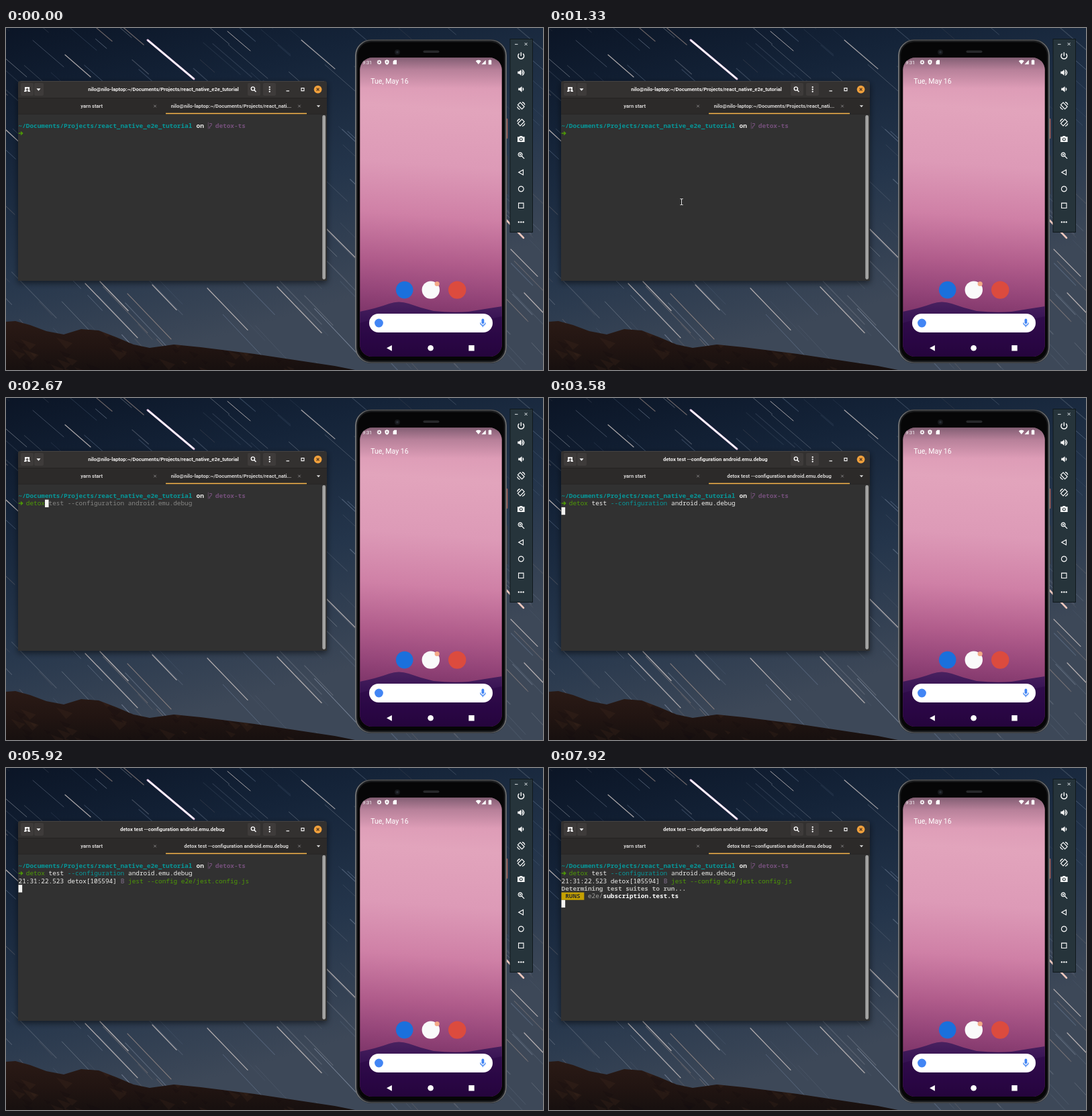
An HTML page with a canvas for the animation above (8 s loop, 800x510 px).

```html
<!DOCTYPE html>
<html lang="en">
<head>
<meta charset="utf-8">
<title>Terminal and phone emulator</title>
<style>
html, body { margin: 0; width: 100%; height: 100%; overflow: hidden; background: #16263b; }
canvas { display: block; width: 800px; height: 510px; }
</style>
</head>
<body>
<canvas id="stage" width="800" height="510"></canvas>
<script>
const LOOP = 8000;
const MONO = '"Noto Sans Mono", "DejaVu Sans Mono", monospace';
const SANS = 'Roboto, "Open Sans", sans-serif';
const GREEN = '#4e9a06', CYAN = '#06989a', PURPLE = '#75507b', WHITE = '#eeeeec';

const stage = document.getElementById('stage').getContext('2d');
const scene = document.createElement('canvas');
scene.width = 800;
scene.height = 510;
let c = scene.getContext('2d');

function seeded(seed) {
  return () => {
    seed = (seed * 1664525 + 1013904223) % 4294967296;
    return seed / 4294967296;
  };
}

function ramp(x0, y0, x1, y1, stops) {
  const g = c.createLinearGradient(x0, y0, x1, y1);
  stops.forEach(([at, color]) => g.addColorStop(at, color));
  return g;
}

function box(x, y, w, h, color, r = 0) {
  c.fillStyle = color;
  c.beginPath();
  c.roundRect(x, y, w, h, r);
  c.fill();
}

function disc(x, y, r, color) {
  c.fillStyle = color;
  c.beginPath();
  c.arc(x, y, r, 0, Math.PI * 2);
  c.fill();
}

function line(x0, y0, x1, y1, color, width) {
  c.strokeStyle = color;
  c.lineWidth = width;
  c.beginPath();
  c.moveTo(x0, y0);
  c.lineTo(x1, y1);
  c.stroke();
}

// Icons are small paths around their own centre.
function strokeIcon(x, y, d, color = '#fff', width = 1.1) {
  c.save();
  c.translate(x, y);
  c.strokeStyle = color;
  c.lineWidth = width;
  c.stroke(new Path2D(d));
  c.restore();
}

function fillIcon(x, y, d, color = '#fff') {
  c.save();
  c.translate(x, y);
  c.fillStyle = color;
  c.fill(new Path2D(d), 'evenodd');
  c.restore();
}

function label(text, x, y, font, color, align = 'left') {
  c.font = font;
  c.fillStyle = color;
  c.textAlign = align;
  c.fillText(text, x, y);
}

// Trails get steeper towards the horizon.
function trail(x, y, len, color, width) {
  const slope = 0.85 + Math.max(y, 0) / 510 * 0.25;
  line(x, y, x + len, y + len * slope, color, width);
}

function drawSky() {
  box(0, 0, 800, 510, ramp(0, 0, 150, 510, [
    [0, '#0b1526'], [0.3, '#142338'], [0.65, '#24354b'], [1, '#3d4858']
  ]));
  const rnd = seeded(29);
  const tints = ['#e6e8ee', '#b3c0d6', '#d8b9a8', '#8499b8'];
  c.lineCap = 'round';
  for (let i = 0; i < 230; i++) {
    const x = rnd() * 880 - 70, y = rnd() * 560 - 50, len = 16 + rnd() * 54;
    c.globalAlpha = 0.1 + rnd() * rnd() * 0.5;
    trail(x, y, len, tints[i % 4], 0.6 + rnd() * 0.7);
  }
  c.globalAlpha = 0.8;
  const bright = [
    [140, 378, 42, 1.4], [218, 383, 36, 1.3], [118, 381, 78, 1.2], [300, 388, 60, 1.2],
    [404, 386, 66, 1.3], [478, 300, 42, 1.3], [88, 40, 38, 1.2], [440, 18, 50, 1.1],
    [330, 5, 34, 1], [0, 152, 18, 1.3], [772, 395, 28, 1.2], [752, 330, 40, 1.1]
  ];
  bright.forEach(([x, y, len, w]) => trail(x, y, len, '#d3c8c6', w));
  c.globalAlpha = 1;
  line(211, 18, 280, 76, '#e9c5e8', 3);
  line(212, 19, 279, 75, '#ffffff', 1.8);
  line(745, 286, 771, 313, '#ecc7bd', 2.6);
  c.lineCap = 'butt';
}

function drawHills() {
  const ridge = [
    [0, 438], [14, 437], [36, 443], [60, 452], [86, 457], [112, 449], [138, 451], [164, 461],
    [190, 472], [214, 477], [250, 472], [290, 476], [330, 481], [370, 486], [410, 492], [450, 498], [490, 504], [520, 510]
  ];
  c.beginPath();
  c.moveTo(0, 510);
  ridge.forEach(([x, y]) => c.lineTo(x, y));
  c.closePath();
  c.fillStyle = ramp(0, 437, 0, 510, [[0, '#2a1a15'], [0.5, '#221512'], [1, '#17100f']]);
  c.fill();
  c.save();
  c.clip();
  const rnd = seeded(7);
  c.globalAlpha = 0.16;
  for (let i = 0; i < 70; i++) {
    const x = rnd() * 420, y = 445 + rnd() * 65, w = 8 + rnd() * 18;
    c.fillStyle = i % 2 ? '#593a2a' : '#0e0b0d';
    c.beginPath();
    c.moveTo(x, y);
    c.lineTo(x + w, y + w * 0.35);
    c.lineTo(x + w * 0.6, y + w * 0.7);
    c.fill();
  }
  c.restore();
}

function drawWindow() {
  c.save();
  c.shadowColor = 'rgba(0,0,0,.55)';
  c.shadowBlur = 10;
  c.shadowOffsetY = 3;
  box(18, 79, 460, 298, '#313131', [4, 4, 0, 0]);
  c.restore();
  box(18, 79, 460, 26, '#333130', [4, 4, 0, 0]);
  box(22, 79, 452, 0.8, '#4a4847');
  box(18, 104, 460, 24, '#2c2a29');
  box(18, 104, 460, 0.8, '#232120');
  box(18, 128, 460, 1, '#272625');
  box(238, 126.7, 210, 1.6, '#fbb84c');
  box(471.3, 130, 4.8, 245, '#a3a3a2', 2.4);

  [[22, 19], [42, 14], [360, 19], [383, 19]].forEach(([x, w]) => box(x, 82, w, 19, '#3e3b3a', 2));
  fillIcon(31.5, 91.5, 'M-3.5 -3.5H3.5V2H4.5V3.5H1V2H-1V3.5H-4.5V2H-3.5ZM-.6 -2V-.6H-2V.6H-.6V2H.6V.6H2V-.6H.6V-2Z');
  fillIcon(48.5, 91.8, 'M-3 -1.5H3L0 2Z');
  strokeIcon(368.5, 91, 'M2 -.5A2.6 2.6 0 1 1 -3.2 -.5A2.6 2.6 0 1 1 2 -.5M1.3 1.5L4 4.2', '#fff', 1.4);
  [-3.3, 0, 3.3].forEach(dy => disc(392.7, 91.5 + dy, 1.15, '#fff'));
  box(417.5, 93.2, 4.5, 1.3, '#eee');
  strokeIcon(442, 91.7, 'M-2 -2H2V2H-2Z', '#eee', 1.2);
  disc(464.6, 91.6, 5.9, '#f0a03c');
  strokeIcon(464.6, 91.6, 'M-1.9 -1.9L1.9 1.9M1.9 -1.9L-1.9 1.9', '#4b3420', 1.2);

  [222, 437].forEach(x => strokeIcon(x, 116.5, 'M-1.8 -1.8L1.8 1.8M1.8 -1.8L-1.8 1.8', '#8c8a89', 0.9));
  fillIcon(465.5, 116.5, 'M-2.7 -1.2H2.7L0 1.8Z', '#ddd');
  label('yarn start', 127.7, 118.7, `bold 7.6px ${SANS}`, '#d6d4d3', 'center');
}

function drawPhone() {
  [[135, 30, '#b8665a'], [190, 58, '#3c3d40']].forEach(([y, h, color]) => box(744, y, 3.2, h, color, 1));
  box(520, 17, 226, 483, '#1b1c1e', 24);
  c.strokeStyle = ramp(520, 0, 746, 0, [[0, '#7b7d80'], [0.1, '#4c4e51'], [0.9, '#4c4e51'], [1, '#737578']]);
  c.lineWidth = 1.7;
  c.beginPath();
  c.roundRect(521, 18, 224, 481, 23);
  c.stroke();
  box(524, 21, 218, 475, '#060607', 20);
  disc(583, 36, 4, '#17181b');
  disc(583, 36, 1.8, '#2c3038');
  box(621.5, 33.4, 24, 3.6, '#27282b', 1.8);

  c.save();
  c.beginPath();
  c.roundRect(527.3, 44.3, 211.4, 445.7, 18);
  c.clip();
  box(527, 44, 212, 446, ramp(645, 44, 620, 425, [
    [0, '#d893b0'], [0.2, '#e2a4bc'], [0.42, '#dd9ab7'], [0.62, '#cf80a6'],
    [0.8, '#b05c8b'], [0.93, '#934478'], [1, '#82386c']
  ]));
  box(527, 44, 212, 46, ramp(0, 44, 0, 90, [[0, 'rgba(60,50,65,.55)'], [0.4, 'rgba(60,50,65,.22)'], [1, 'rgba(60,50,65,0)']]));
  fillIcon(527, 0, 'M0 423Q25 418 44 411Q58 406 73 411Q92 418 110 422Q138 425 162 423Q186 419 212 415V490H0Z',
    ramp(0, 408, 0, 490, [[0, '#4a2260'], [0.3, '#381454'], [0.7, '#2d0847'], [1, '#24053a']]));
  fillIcon(527, 0, 'M0 440Q45 426 90 437T212 430V490H0Z', 'rgba(38,6,66,.45)');
  label('9:31', 531, 53.6, `7.4px ${SANS}`, '#fff');
  c.restore();

  strokeIcon(556, 51, 'M2 0A2 2 0 1 1 -2 0A2 2 0 1 1 2 0', '#fff', 1.5);
  for (let i = 0; i < 8; i++) {
    const a = i * Math.PI / 4;
    disc(556 + Math.cos(a) * 2.9, 51 + Math.sin(a) * 2.9, 0.6, '#fff');
  }
  fillIcon(567.5, 51, 'M0 -3.8L3 -2.6V0Q3 2.7 0 3.8Q-3 2.7 -3 0V-2.6ZM-.7 -1.5H.7V1.2H-.7Z');
  fillIcon(579.3, 51, 'M-.8 -3.3H2.7V3.3H-2.7V-1.3Z');
  fillIcon(703.8, 51, 'M-4 -1.8Q0 -4.6 4 -1.8L0 3.2Z');
  fillIcon(711.8, 51, 'M3 -3.3V3.2H-3.3Z');
  fillIcon(721, 51, 'M-1 -3.6H1V-3H2.2V3.4H-2.2V-3H-1Z');
  label('Tue, May 16', 543.2, 82.6, `10.6px ${SANS}`, '#fff');

  disc(593.7, 390.6, 12.8, '#1a70dc');
  disc(632.8, 390.6, 13.2, '#fafafa');
  disc(642.2, 381.5, 3.6, '#f3a986');
  disc(672.2, 390.6, 13.2, '#dc4b3e');
  box(541, 426, 184, 28, '#fff', 14);
  disc(555.5, 440, 6.4, '#4285f4');
  box(708.5, 433.6, 3.8, 7.6, '#4285f4', 1.9);
  strokeIcon(710.4, 440, 'M-3.7 -.4A3.7 3.7 0 0 0 3.7 -.4M0 3.4V6', '#4285f4', 1.3);
  fillIcon(571.3, 477.3, 'M-4.3 0L3.6 -4.4V4.4Z');
  disc(632.6, 477.3, 4.3, '#fff');
  box(689.3, 473.1, 8.4, 8.4, '#fff');
}

function drawPanel() {
  box(750.5, 16, 34.5, 289, '#10181c');
  box(751.5, 17, 32.5, 287, '#26343b');
  const x = 767.3;
  line(758, 24.3, 762.5, 24.3, '#dfe5e8', 1);
  strokeIcon(774.6, 24, 'M-2 -2L2 2M2 -2L-2 2', '#dfe5e8', 1);
  strokeIcon(x, 41.5, 'M-2.9 -3.2A4.4 4.4 0 1 0 2.9 -3.2M0 -5.2V.3', '#fff', 1.4);
  const speaker = 'M-5 -1.7H-2.8L.2 -4.4V4.4L-2.8 1.7H-5Z';
  fillIcon(x, 66.5, speaker);
  strokeIcon(x, 66.5, 'M1.5 -2Q3.2 0 1.5 2M1.8 -4.3Q7.2 0 1.8 4.3', '#fff', 1.3);
  fillIcon(x + 1, 91.3, speaker);
  strokeIcon(x + 1, 91.3, 'M1.5 -2Q3.4 0 1.5 2', '#fff', 1.3);
  const rotate = 'M-4.8 -1.3L-1.3 -4.8L4.8 1.3L1.3 4.8ZM1.6 -5.4Q4.9 -4.6 5.6 -1.4M-1.6 5.4Q-4.9 4.6 -5.6 1.4';
  strokeIcon(x, 116, rotate, '#fff', 1.2);
  c.save();
  c.translate(x, 141);
  c.scale(-1, 1);
  strokeIcon(0, 0, rotate, '#fff', 1.2);
  c.restore();
  fillIcon(x, 165.5, 'M-5.3 -3.3H-2.6L-1.6 -4.6H1.6L2.6 -3.3H5.3V4.4H-5.3ZM2.5 .5A2.5 2.5 0 1 0 -2.5 .5A2.5 2.5 0 1 0 2.5 .5Z');
  disc(x, 166, 1.4, '#fff');
  strokeIcon(x, 190, 'M1.7 -1.2A2.9 2.9 0 1 1 -4.1 -1.2A2.9 2.9 0 1 1 1.7 -1.2M1 1L4.8 4.8M-2.6 -1.2H.2M-1.2 -2.6V.2', '#fff', 1.2);
  strokeIcon(x, 215.3, 'M-3.6 0L3.2 -3.8V3.8Z');
  strokeIcon(x, 240, 'M3.9 0A3.9 3.9 0 1 1 -3.9 0A3.9 3.9 0 1 1 3.9 0');
  strokeIcon(x, 264.8, 'M-3.7 -3.7H3.7V3.7H-3.7Z');
  [-3.4, 0, 3.4].forEach(dx => disc(x + dx, 289.4, 1.2, '#fff'));
}

const CELL = 5.64, ROW = 11.3, LEFT = 18.5, TOP = 140.3;

function put(row, col, text, color, bold) {
  label(text, LEFT + col * CELL, TOP + row * ROW + 8.7, `${bold ? 'bold ' : ''}9.4px ${MONO}`, color);
}

function block(row, col) {
  box(LEFT + col * CELL, TOP + row * ROW, CELL, ROW, '#f4f4f2');
}

const PATH = '~/Documents/Projects/react_native_e2e_tutorial';
const HOST = 'nilo@nilo-laptop:';
const COMMAND = 'detox test --configuration android.emu.debug';
const KEYS = [1920, 2080, 2250, 2420, 2580];
const ACCEPT = 2920, ENTER = 3330, JEST = 4580, SEARCH = 6580, RUNS = 7170;

function drawTitles(t) {
  const font = `bold 7.6px ${SANS}`;
  const busy = t >= ENTER;
  label(busy ? COMMAND : HOST + PATH, busy ? 247.8 : 234.5, 94.3, font, '#f2f0ef', 'center');
  label(busy ? COMMAND : HOST + PATH.slice(0, 31) + '...', busy ? 343 : 335.5, 118.7, font, '#d6d4d3', 'center');
}

function drawPrompt() {
  put(0, 0, PATH, CYAN, true);
  put(0, 47, 'on', WHITE, true);
  line(301.3, 140.5, 301.3, 150.5, '#69506d', 0.9);
  strokeIcon(304.6, 146, 'M-1.6 -3.5H1.6V-1.2L-1.3 1.5V4', PURPLE, 1.1);
  put(0, 52, 'detox-ts', PURPLE, true);
  strokeIcon(21.8, 157, 'M-3 0H2.6M.2 -2.6L2.9 0L.2 2.6', GREEN, 1.4);
}

function drawCommand(t) {
  if (t >= ACCEPT) {
    put(1, 2, 'detox', GREEN);
    put(1, 8, 'test', WHITE);
    put(1, 13, '--configuration', CYAN);
    put(1, 29, 'android.emu.debug', WHITE);
    if (t < ENTER) block(1, 46);
    return;
  }
  const typed = KEYS.filter(k => t >= k).length;
  if (!typed) return;
  put(1, 2, COMMAND.slice(0, typed), GREEN);
  put(1, 2 + typed, COMMAND.slice(typed), '#858583');
  block(1, 2 + typed);
  put(1, 2 + typed, COMMAND[typed], '#555753');
}

function drawOutput(t) {
  if (t < ENTER) return;
  let row = 2;
  if (t >= JEST) {
    put(2, 0, '21:31:22.523 detox[105594]', WHITE);
    put(2, 27, 'B', '#857391');
    put(2, 29, 'jest --config e2e/jest.config.js', GREEN);
    row = 3;
  }
  if (t >= SEARCH) {
    put(3, 0, 'Determining test suites to run...', '#babab7', true);
    row = 4;
  }
  if (t >= RUNS) {
    box(LEFT, TOP + 4 * ROW, CELL * 6, ROW, '#c4a000');
    put(4, 1, 'RUNS', '#2e2e2a', true);
    put(4, 7, 'e2e/', '#a0a09d');
    put(4, 11, 'subscription.test.ts', '#ffffff', true);
    row = 5;
  }
  block(row, 0);
}

function drawPointer(t) {
  if (t < 900 || t >= KEYS[0]) return;
  const beam = 'M-2.3 -4.5H-.7L0 -3.8L.7 -4.5H2.3M0 -3.8V3.8M-2.3 4.5H-.7L0 3.8L.7 4.5H2.3';
  strokeIcon(197.5, 259.3, beam, '#161616', 2.4);
  strokeIcon(197.5, 259.3, beam, '#e8e8e8', 1.1);
}

drawSky();
drawHills();
drawWindow();
drawPhone();
drawPanel();
c = stage;

const start = performance.now();
function frame() {
  const t = (performance.now() - start) % LOOP;
  c.drawImage(scene, 0, 0);
  drawTitles(t);
  drawPrompt();
  drawCommand(t);
  drawOutput(t);
  drawPointer(t);
  requestAnimationFrame(frame);
}
frame();
</script>
</body>
</html>
```
